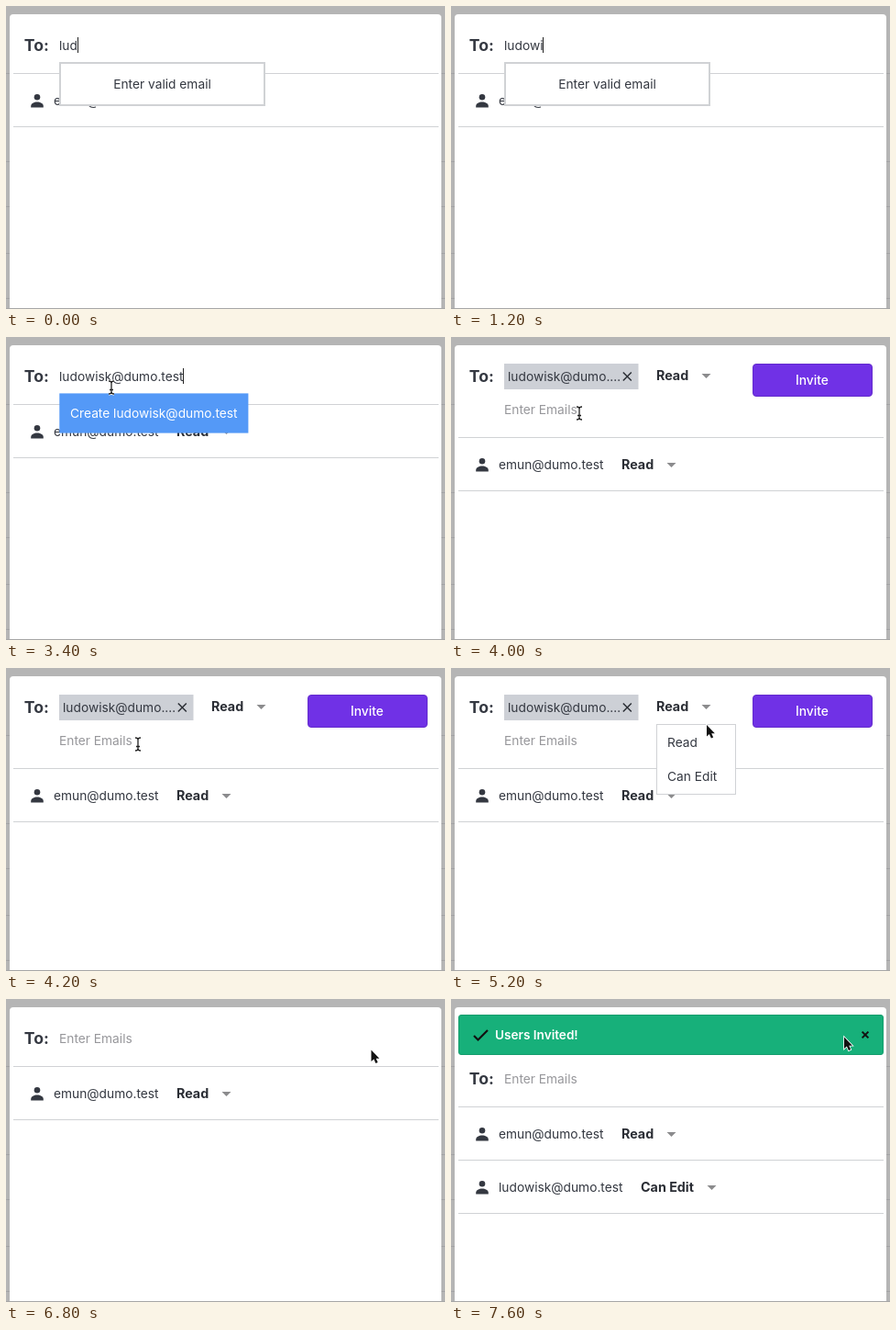
Recreate the animation shown at these times as an HTML page. Size 479 px wide and 330 px high, loop 8 s.

```html
<!DOCTYPE html>
<html lang="en">
<head>
<meta charset="utf-8">
<title>Invite dialog</title>
<style>
html, body { margin: 0; width: 100%; height: 100%; overflow: hidden; background: #b5b5b5; }
svg { display: block; width: 479px; height: 330px; }
text { font-family: Inter, "Open Sans", sans-serif; white-space: pre; }
</style>
</head>
<body>
<svg id="stage" viewBox="0 0 479 330"></svg>
<script>
const LOOP = 8000, STEP = 200;
const INK = '#343841', LINE = '#d0d2d5', SIZE = 13.75;
const EMAIL = 'ludowisk@dumo.test', MEMBER = 'emun@dumo.test';
const stage = document.getElementById('stage');
const pen = document.createElement('canvas').getContext('2d');

// [time, typed letters]
const typing = [[0, 3], [200, 4], [1000, 5], [1200, 6], [1400, 8], [1600, 9],
  [2000, 10], [2400, 12], [2600, 14], [2800, 16], [3000, 18]];

// [time, x, y, shape]
const pointer = [[3200, 126, 70, 'beam'], [3400, 115, 55, 'beam'], [3800, 125, 76, 'arrow'],
  [4000, 140, 83, 'beam'], [4200, 144, 83, 'beam'], [4400, 192, 73, 'beam'],
  [4600, 250, 52, 'arrow'], [4800, 278, 42, 'arrow'], [5200, 279, 62, 'arrow'],
  [5400, 276, 100, 'arrow'], [5600, 276, 112, 'arrow'], [5800, 285, 107, 'arrow'],
  [6000, 307.5, 87, 'arrow'], [6200, 345, 68, 'arrow'], [6400, 388, 52, 'arrow'],
  [6600, 398.5, 55.5, 'arrow'], [7400, 415, 47, 'arrow'], [7600, 429, 41.5, 'arrow']];

const latest = (keys, t) => keys.filter(k => k[0] <= t).pop();

function width(str) {
  pen.font = `400 ${SIZE}px Inter, "Open Sans", sans-serif`;
  return pen.measureText(str).width;
}

const rect = (x, y, w, h, fill, extra = '') =>
  `<rect x="${x}" y="${y}" width="${w}" height="${h}" fill="${fill}" ${extra}/>`;
const path = (d, fill, extra = '') => `<path d="${d}" fill="${fill}" ${extra}/>`;
const text = (str, x, y, fill = INK, size = SIZE, weight = 400, anchor = 'start') =>
  `<text x="${x}" y="${y}" fill="${fill}" font-size="${size}" font-weight="${weight}" text-anchor="${anchor}">${str}</text>`;
const rule = y => rect(8, y, 464, 1, LINE);
const cross = (x, y, r, color, w) =>
  path(`M${x - r} ${y - r}l${2 * r} ${2 * r}m0 ${-2 * r}l${-2 * r} ${2 * r}`, 'none',
    `stroke="${color}" stroke-width="${w}"`);

function role(name, x, y) {
  const tip = x + (name === 'Read' ? 54.5 : 77.5);
  return text(name, x, y + 5, '#2b2e35', 14.3, 700) +
    path(`M${tip - 5} ${y - 2}h10l-5 5z`, '#8b8b8d');
}

function person(y) {
  return `<circle cx="34" cy="${y - 3.8}" r="3.3" fill="${INK}"/>` +
    path(`M27.2 ${y + 7.6}v-1.6c0-3 3.5-4.6 6.8-4.6s6.8 1.6 6.8 4.6v1.6z`, INK);
}

const row = (email, name, x, y) =>
  person(y) + text(email, 52, y + 5) + role(name, x, y) + rule(y + 28);

const toLabel = y => text('To:', 19.8, y + 6, INK, 17.6, 700);
const placeholder = y => text('Enter Emails', 58, y + 5, '#97979b');

function backdrop() {
  return rect(0, 0, 479, 330, '#b5b5b5') +
    [73, 169, 218, 269, 318].map(y => rect(0, y, 479, 1, '#a3a3a5')).join('') +
    path('M4 330V13q0-4 4-4h463q4 0 4 4v317z', '#fff') +
    rect(0, 329, 479, 1, '#a6a6a6');
}

function typingView(t) {
  const str = EMAIL.slice(0, latest(typing, t)[1]);
  const caretOn = t < 600 || t >= 1000;
  let out = toLabel(43) + text(str, 58, 48) + rule(73) + row(MEMBER, 'Read', 186, 103);
  if (caretOn) out += rect(Math.round(58 + width(str)), 34, 1, 17, '#222');
  if (t < 3000) {
    return out + rect(59, 62, 223, 46, '#fff', `stroke="${LINE}" stroke-width="2"`) +
      text('Enter valid email', 170.5, 90, INK, SIZE, 400, 'middle');
  }
  return out + rect(58.3, 61.4, 206.1, 43.2, '#5499f7') + text('Create ' + EMAIL, 70, 88, '#fff');
}

function chipView(t) {
  let out = toLabel(43) + rect(58, 29, 146.5, 28, '#cdd0d6') +
    text(EMAIL.slice(0, 14) + '…', 62, 48) + cross(192.3, 43, 4.5, '#2b2e35', 1.5) +
    role(t < 5800 ? 'Read' : 'Can Edit', 224, 42) +
    rect(329.5, 29.5, 130, 35, '#7031e6', 'rx="3.5" stroke="#632bcd"') +
    text('Invite', 394, 52, '#fff', 13.8, 500, 'middle') +
    placeholder(79) + rule(109) + row(MEMBER, 'Read', 186, 139);
  if (t >= 5000 && t < 5800) {
    out += rect(224.5, 61.5, 86, 76, '#fff', `stroke="${LINE}"`);
    if (t >= 5400) out += rect(225, 100, 85, 37, '#e9ebef');
    out += text('Read', 236, 86) + text('Can Edit', 236, 123);
  }
  return out;
}

function clearedView() {
  return toLabel(43) + placeholder(43) + rule(73) + row(MEMBER, 'Read', 186, 103);
}

function invitedView() {
  return rect(8.5, 17.5, 463, 43, '#17b07a', 'rx="2.5" stroke="#149c6c"') +
    path('M25 40l4.5 4.5L40 34', 'none', 'stroke="#111" stroke-width="2.2"') +
    text('Users Invited!', 48, 44, '#fff', 13.6, 600) +
    cross(452, 39, 3.4, '#111', 2) +
    toLabel(87) + placeholder(87) + rule(117) +
    row(MEMBER, 'Read', 186, 147) + row(EMAIL, 'Can Edit', 207, 205);
}

function cursor(t) {
  const key = latest(pointer, t);
  if (!key) return '';
  const [, x, y, shape] = key;
  if (shape === 'arrow') {
    return path(`M${x} ${y}v12.6l2.9-2.6 2 4.6 2.3-1-2-4.4h3.7z`, '#111',
      'stroke="#fff" stroke-width="1.6" paint-order="stroke"');
  }
  const d = `M${x - 3} ${y - 7}q3 0 3 2q0-2 3-2M${x} ${y - 5}v10M${x - 3} ${y + 7}q3 0 3-2q0 2 3 2M${x - 2} ${y + 2.5}h4`;
  return path(d, 'none', 'stroke="#fff" stroke-width="3"') +
    path(d, 'none', 'stroke="#222" stroke-width="1.3"');
}

function view(t) {
  if (t < 4000) return typingView(t);
  if (t < 6800) return chipView(t);
  return t < 7000 ? clearedView() : invitedView();
}

let shown = -1;
function tick() {
  const t = Math.floor(performance.now() % LOOP / STEP) * STEP;
  if (t !== shown) {
    shown = t;
    stage.innerHTML = backdrop() + view(t) + cursor(t);
  }
  requestAnimationFrame(tick);
}
tick();
</script>
</body>
</html>
```
